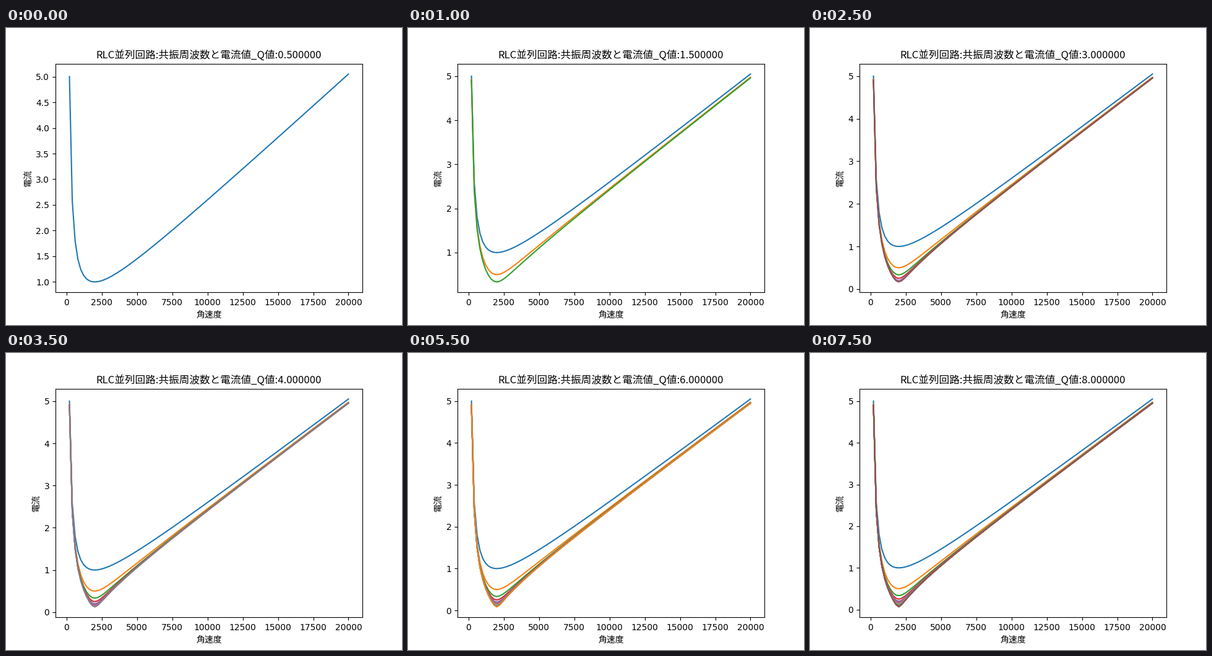
A matplotlib script that plays this animation: 640x480 px, repeating every 8 s.

```python
import numpy as np
import matplotlib.pyplot as plt
from matplotlib.animation import FuncAnimation

FRAMES, INTERVAL = 16, 500
JP = {"fontfamily": "Noto Sans CJK JP"}

CAPACITANCE = 2.5e-4
INDUCTANCE = 1 / 990
omega = np.linspace(200, 20000, 100)
susceptance = omega * CAPACITANCE - 1 / (omega * INDUCTANCE)


def q_value(step):
    return 0.5 * (step + 1)


def current(q):
    """Magnitude of the parallel circuit's current at unit voltage."""
    return np.hypot(0.5 / q, susceptance)


fig, ax = plt.subplots(figsize=(6.4, 4.8), dpi=100)


def update(step):
    ax.clear()
    for k in range(step + 1):
        ax.plot(omega, current(q_value(k)))
    ax.set_title(f"RLC並列回路:共振周波数と電流値_Q値:{q_value(step):f}", **JP)
    ax.set_xlabel("角速度", **JP)
    ax.set_ylabel("電流", **JP)
    return ax.lines


anim = FuncAnimation(fig, update, frames=FRAMES, init_func=lambda: update(0),
                     interval=INTERVAL, repeat=True, repeat_delay=0)
plt.show()
```
